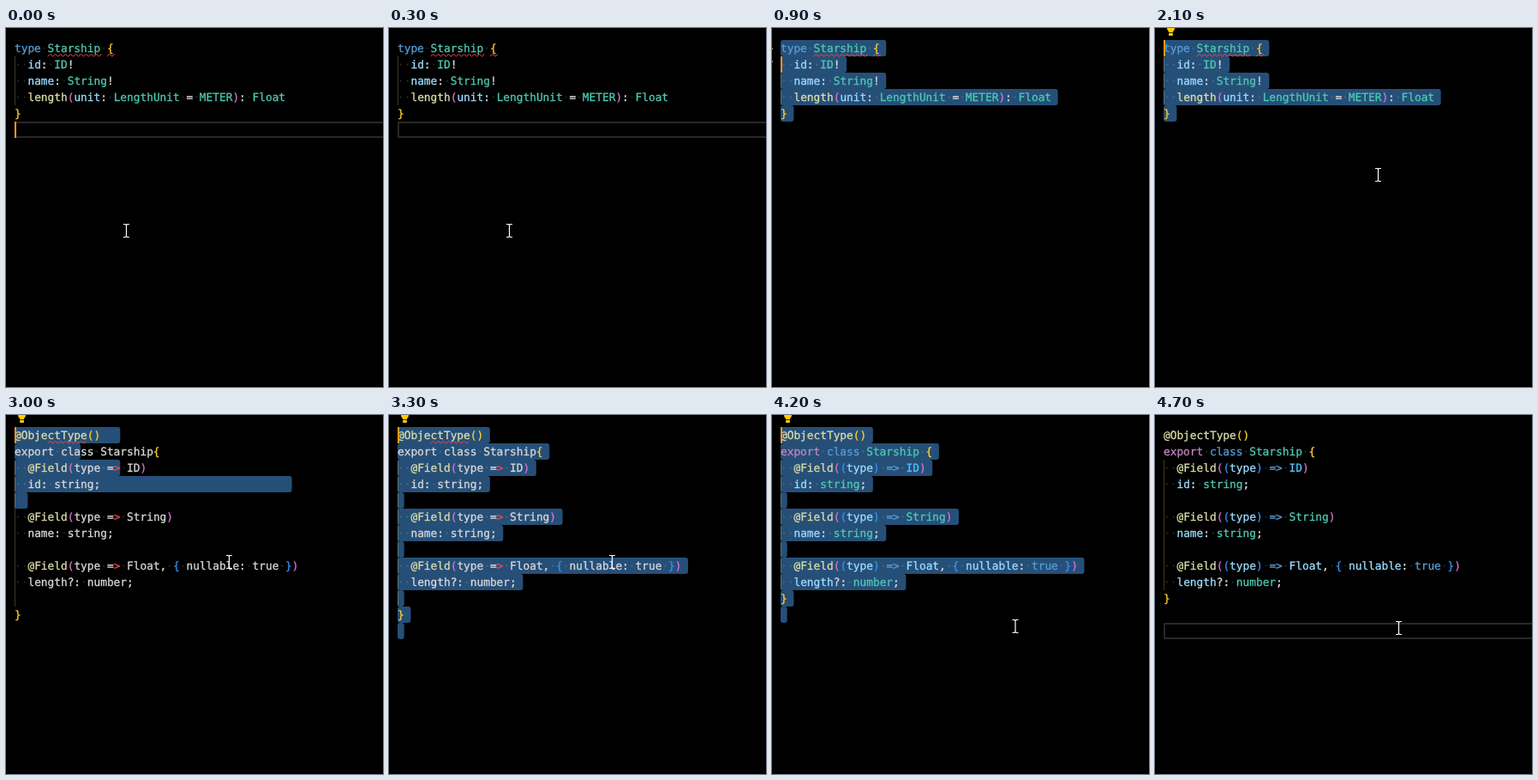
An HTML page that plays this animation: 440 by 418 pixels, repeating every 5200 ms.

```html
<!DOCTYPE html>
<html lang="en">
<head>
<meta charset="utf-8">
<title>Code conversion</title>
<style>
  html, body { margin: 0; width: 100%; height: 100%; overflow: hidden; background: #000; }
  svg, pre { position: absolute; left: 0; top: 0; margin: 0; }
  svg { width: 440px; height: 418px; overflow: hidden; }
  pre {
    left: 10px; top: 15px; color: #d8d8d8;
    font: 12.8px/19px "DejaVu Sans Mono", monospace;
    text-rendering: geometricPrecision; font-variant-ligatures: none;
    -webkit-text-stroke: .3px currentColor;
  }
  .ws { color: rgba(227, 228, 226, .2); -webkit-text-stroke: 0; }
  .kw { color: #569cd6; }
  .ctl { color: #c586c0; }
  .type { color: #4ec9b0; }
  .const { color: #4fc1ff; }
  .prop { color: #9cdcfe; }
  .fn { color: #dcdcaa; }
  .bad { color: #f44747; }
  .b0 { color: #ffd02e; }
  .b1 { color: #da70d6; }
  .b2 { color: #2f93f5; }
  .sel { fill: #264f78; }
  .line { fill: none; stroke: #282828; stroke-width: 2; }
  .guide { fill: #ffe27a; opacity: .25; }
  .wave { fill: none; stroke: #f14c4c; stroke-width: 1; }
  .caret { fill: #ff9a1f; }
  .bulb { fill: #fc0; }
  .mouse { fill: none; stroke: #fff; stroke-width: 1.2; }
</style>
</head>
<body>
<svg id="under"></svg>
<pre id="code"></pre>
<svg id="over"></svg>
<script>
const LOOP = 5200, COL = 7.706, ROW = 19, LEFT = 10, TOP = 14;

const schema = `type Starship {
  id: ID!
  name: String!
  length(unit: LengthUnit = METER): Float
}`;

const pasted = `@ObjectType()
export class Starship{
  @Field(type => ID)
  id: string;

  @Field(type => String)
  name: string;

  @Field(type => Float, { nullable: true })
  length?: number;

}
`;

const tidy = `@ObjectType()
export class Starship {
  @Field((type) => ID)
  id: string;

  @Field((type) => String)
  name: string;

  @Field((type) => Float, { nullable: true })
  length?: number;
}
`;

// Named groups become the colour classes.
const graphql = /(?<kw>\btype\b)|(?<fn>length(?=\())|(?<type>[A-Z]\w*)|(?<prop>[a-z]\w*)/;
const foreign = /(?<fn>@\w+)|(?<bad>>)/;
const script = /(?<fn>@\w+)|(?<ctl>export)|(?<kw>class|true|=>)|(?<const>\bID\b)|(?<type>Starship|[Ss]tring|number)|(?<prop>[A-Za-z]\w*)/;

const span = (cls, text) => `<span class="${cls}">${text.replace(/>/g, '&gt;')}</span>`;

function highlight(text, grammar) {
  let depth = 0;
  const tokens = new RegExp(grammar.source + '|(?<open>[({])|(?<close>[)}])|(?<ws> )', 'g');
  return text.replace(tokens, (token, ...rest) => {
    const groups = rest[rest.length - 1];
    const kind = Object.keys(groups).find(k => groups[k] !== undefined);
    if (kind === 'open') return span('b' + depth++, token);
    if (kind === 'close') return span('b' + --depth, token);
    return span(kind, kind === 'ws' ? '·' : token);
  });
}

// Each entry changes part of the state and holds until the next one.
const changes = [
  [0, { text: schema, grammar: graphql, guide: [1, 4], waves: [[5, 8], [14, 1]],
        sel: null, line: 5, caret: 5, bulb: false, mouse: [140.5, 236] }],
  [200, { caret: null }],
  [400, { mouse: [122, 217] }],
  [500, { mouse: [62, 162] }],
  [600, { mouse: [12, 118] }],
  [700, { mouse: [6, 96], line: null, sel: [schema, 4], caret: 4 }],
  [800, { mouse: [1, 62], sel: [schema, 2], caret: 2 }],
  [900, { mouse: [-2.5, 31.5], sel: [schema, 0], caret: 1 }],
  [1000, { mouse: [-20, 25], caret: 0 }],
  [1200, { bulb: true }],
  [1600, { mouse: [5, 39], caret: null }],
  [1900, { mouse: [70, 75] }],
  [2000, { mouse: [190, 140] }],
  [2100, { mouse: [260.5, 171], caret: 0 }],
  [2700, { caret: null }],
  [3000, { text: pasted, grammar: foreign, guide: [2, 11], waves: [[5, 6]], caret: 0 }],
  [3300, { sel: [pasted, 0] }],
  [3400, { grammar: script }],
  [3500, { caret: null }],
  [3800, { text: tidy, guide: [2, 10], waves: [[12.6, 1]], sel: [tidy, 0], caret: 0, mouse: [266.5, 180] }],
  [3900, { waves: [], mouse: [272, 202] }],
  [4100, { mouse: [280, 232] }],
  [4200, { mouse: [284, 246] }],
  [4300, { mouse: [284.5, 248], sel: null, line: 12, caret: 12 }],
  [4600, { bulb: false }],
  [4700, { caret: null }]
];

let state = {};
const steps = changes.map(([at, change]) => ({ at, ...(state = { ...state, ...change }) }));

const rowY = row => TOP + row * ROW;
const rect = (cls, x, y, w, h, r = 0) =>
  `<rect class="${cls}" x="${x}" y="${y}" width="${w}" height="${h}" rx="${r}"/>`;
const path = (cls, d) => `<path class="${cls}" d="${d}"/>`;

function selection([text, from]) {
  return text.split('\n').map((line, row) => row < from ? '' :
    rect('sel', LEFT, rowY(row), (line.length + 1) * COL, ROW, 3)).join('');
}

function wave([col, length]) {
  const count = Math.round(length * COL / 3);
  return path('wave', `M${LEFT + col * COL} 33` +
    Array.from({ length: count }, (_, i) => `l3 ${i % 2 ? 2.5 : -2.5}`).join(''));
}

const bulb = () => path('bulb', 'M14 0h9a4.5 4.5 0 0 1 -2 4.2v1h-5v-1a4.5 4.5 0 0 1 -2 -4.2z') +
  rect('bulb', 16, 6, 5, 3, 1);

function ibeam([x, y]) {
  return path('mouse', `M${x - 3.5} ${y - 7.5}h2.5l1 1l1 -1h2.5M${x} ${y - 6.5}v13` +
    `M${x - 3.5} ${y + 7.5}h2.5l1 -1l1 1h2.5`);
}

const [under, code, over] = ['under', 'code', 'over'].map(id => document.getElementById(id));

function draw(s) {
  const [first, end] = s.guide;
  under.innerHTML =
    (s.sel ? selection(s.sel) : '') +
    (s.line === null ? '' : rect('line', LEFT + 1, rowY(s.line) + 1, 440, ROW - 2)) +
    rect('guide', LEFT, rowY(first), 1, (end - first) * ROW);
  code.innerHTML = highlight(s.text, s.grammar);
  over.innerHTML =
    s.waves.map(wave).join('') +
    (s.caret === null ? '' : rect('caret', LEFT, rowY(s.caret), 2, ROW)) +
    (s.bulb ? bulb() : '') +
    ibeam(s.mouse);
}

let shown = null;
function tick() {
  const now = performance.now() % LOOP;
  const step = steps.filter(s => s.at <= now).pop();
  if (step !== shown) draw(shown = step);
  requestAnimationFrame(tick);
}
tick();
</script>
</body>
</html>
```
